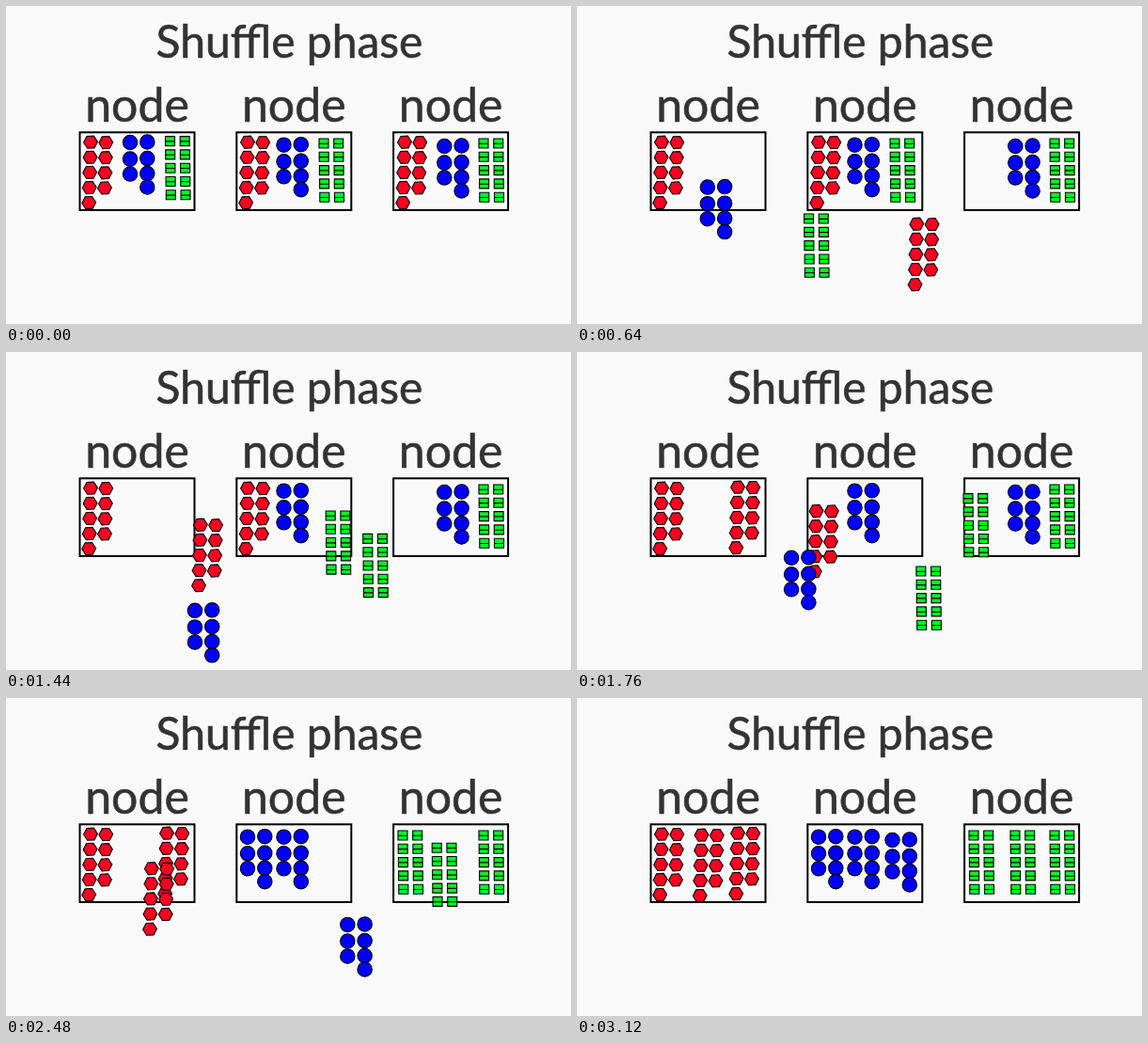
Recreate the animation shown at these times as an HTML page. Size 601x338 px, loop 3.64 s.

```html
<!DOCTYPE html>
<html lang="en">
<head>
<meta charset="utf-8">
<title>Shuffle phase</title>
<style>
  html, body { margin: 0; width: 100%; height: 100%; overflow: hidden; background: #fafafa; }
  svg { display: block; width: 100%; height: 100%; }
  text { font: 50px Lato, "Open Sans", sans-serif; fill: #333; stroke: #333; stroke-width: 0.6; text-anchor: middle; }
  .title { font-size: 48px; }
  .box { fill: none; stroke: #000; stroke-width: 2; }
  .item { stroke: #000; stroke-width: 1.1; }
  .red { fill: #fc0022; }
  .blue { fill: #0000fb; }
  .green { fill: #00f524; }
</style>
</head>
<body>
<svg viewBox="0 0 601 338">
  <defs></defs>
  <text class="title" x="301.5" y="54.5">Shuffle phase</text>
</svg>
<script>
const svg = document.querySelector('svg');
const defs = document.querySelector('defs');
const LOOP = 3640, STEP = 40;

function add(parent, tag, attrs, text) {
  const el = document.createElementNS('http://www.w3.org/2000/svg', tag);
  for (const name in attrs) el.setAttribute(name, attrs[name]);
  if (text) el.textContent = text;
  return parent.appendChild(el);
}

for (let i = 0; i < 3; i++) {
  const x = 78.5 + i * 166.8;
  add(svg, 'text', { x: x + 61, y: 122.5 }, 'node');
  add(svg, 'rect', { class: 'box', x, y: 134.3, width: 122, height: 82.6 });
}

const hexagon = Array.from({ length: 6 }, (_, i) => {
  const a = i * Math.PI / 3 - 0.05;
  return `${7.4 * Math.cos(a)} ${7.4 * Math.sin(a)}`;
}).join('L');

// Every cluster has two columns and is placed by its top left item.
const shapes = {
  red: {
    count: 9,
    draw(g, row, col) {
      const x = col * 16.3 - row * 0.45, y = row * 16.1 + col * 0.4;
      add(g, 'path', { class: 'item red', d: `M${hexagon}Z`, transform: `translate(${x} ${y})` });
    }
  },
  blue: {
    count: 7,
    draw(g, row, col) {
      const cy = row * (18.4 - row * 0.8) - col * 0.5;
      add(g, 'circle', { class: 'item blue', cx: col * 18.3, cy, r: 7.7 });
    }
  },
  green: {
    count: 10,
    draw(g, row, col) {
      const x = col * 15.7 + row * 0.2 - 5, y = row * 14.3 - 5;
      add(g, 'path', { class: 'item green', d: `M${x} ${y}h10v10h-10zM${x} ${y + 5.3}h10` });
    }
  }
};

function cluster(kind, x, y) {
  const { count, draw } = shapes[kind];
  const g = add(svg, 'g', { transform: `translate(${x} ${y})` });
  for (let i = 0; i < count; i++) {
    // The odd blue circle hangs in the right column.
    const col = kind === 'blue' && i === count - 1 ? 1 : i % 2;
    draw(g, i >> 1, col);
  }
  return g;
}

const glide = u => 0.75 * u + 0.25 * u * u * (3 - 2 * u);
const settle = u => 1 - (1 - u) ** 1.6;

function move(kind, begin, duration, d, ease = glide) {
  const path = add(defs, 'path', { d });
  return { g: cluster(kind, 0, 0), path, length: path.getTotalLength(), begin, duration, ease };
}

cluster('green', 508, 146);
cluster('red', 90, 144.7);
cluster('blue', 295.5, 147.7);

const moves = [
  move('green', 0, 1840, 'M174.5 143.6C263 280 341 280 422 146'),
  move('green', 1260, 1320, 'M338 146C372 283 386 283 466 146'),
  move('red', 85, 1655, 'M424 144.7C356 283 287 283 171 143.7'),
  move('red', 1650, 1010, 'M257 144.7C243 296 225 296 132.5 145.7'),
  move('blue', 330, 1900, 'M132 145C160 352 177 352 257 147.7'),
  move('blue', 1985, 1135, 'M466.3 149C375 274 349 274 335.5 151', settle)
];

function draw(t) {
  for (const { g, path, length, begin, duration, ease } of moves) {
    const u = Math.min(1, Math.max(0, (t - begin) / duration));
    const { x, y } = path.getPointAtLength(length * ease(u));
    g.setAttribute('transform', `translate(${x} ${y})`);
  }
}

const start = performance.now();
function tick() {
  const t = (performance.now() - start) % LOOP;
  draw(Math.floor(t / STEP) * STEP);
  requestAnimationFrame(tick);
}
tick();
</script>
</body>
</html>
```
